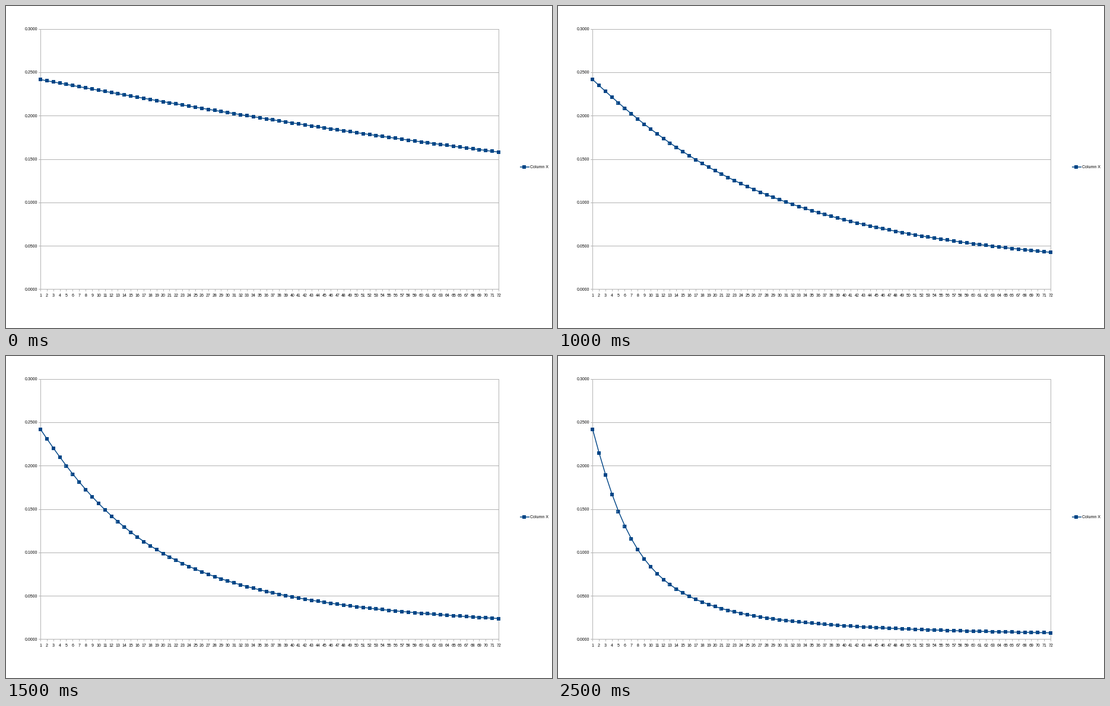
These frames come from a looping animation (920x544 px, 3 s). A matplotlib script:

```python
import numpy as np
import matplotlib.pyplot as plt
from matplotlib.animation import FuncAnimation
from matplotlib.collections import LineCollection, PolyCollection

W, H, DPI = 920, 544, 64
PT = 72 / DPI  # points per pixel
LEFT, RIGHT, TOP, BOTTOM = 58.5, 830.5, 39.5, 478.5
BLUE, GREY = "#004586", "#b3b3b3"
Y_MAX, COUNT, START = 0.3, 72, 0.242
RATES = [0.01, 0.02, 0.05, 0.08, 0.1, 0.2]


def to_x(n):
    return LEFT + (n - 1) * (RIGHT - LEFT) / (COUNT - 1)


def to_y(value):
    return BOTTOM - value * (BOTTOM - TOP) / Y_MAX


def decay(rate):
    """Each value shrinks by a share that depends on the value itself."""
    values = [START]
    while len(values) < COUNT:
        v = values[-1]
        u = -np.log(v)
        loss = rate * v * (4.044 * u - 0.225 * u * u - 2.917)
        values.append(v * (1 - loss + loss * loss / 6))
    return np.array(values)


def squares(xs, ys):
    r = 2.5
    return [[(x - r, y - r), (x + r, y - r), (x + r, y + r), (x - r, y + r)]
            for x, y in zip(xs, ys)]


def outlines(xs, ys):
    """Squares aligned to whole pixels."""
    return squares(np.floor(xs), np.floor(np.asarray(ys) + 0.5))


def add_series(xs, ys):
    line, = ax.plot(xs, ys, color=BLUE, lw=1.45 * PT, snap=False, zorder=3,
                    solid_joinstyle="round", solid_capstyle="butt")
    fill = PolyCollection(squares(xs, ys), facecolors=BLUE,
                          edgecolors="none", snap=False, zorder=4)
    edge = PolyCollection(outlines(xs, ys), facecolors="none",
                          edgecolors=BLUE, linewidths=PT, snap=False, zorder=5)
    ax.add_collection(fill)
    ax.add_collection(edge)
    return line, fill, edge


def label(x, y, text, align):
    ax.text(x, y, text, ha=align, va="baseline", color="black",
            family="Liberation Sans", fontsize=7 * PT)


fig = plt.figure(figsize=(W / DPI, H / DPI), dpi=DPI, facecolor="white")
ax = fig.add_axes([0, 0, 1, 1])
ax.set_xlim(0, W)
ax.set_ylim(H, 0)
ax.axis("off")

# Walls, grid, ticks and axis labels
xs = to_x(np.arange(1, COUNT + 1))
rules = [[(x, TOP), (x, BOTTOM)] for x in (LEFT, RIGHT)]
for k in range(7):
    value = k * 0.05
    row = np.floor(to_y(value)) + 0.5
    rules.append([(LEFT - 3.5, row), (RIGHT + 0.5, row)])
    label(53, round(481 - k * 220 / 3), f"{value:.4f}", "right")
for n, x in enumerate(xs, 1):
    tick = np.floor(x) + 0.5
    rules.append([(tick, BOTTOM), (tick, BOTTOM + 3.5)])
    label(x - 0.3, 491, str(n), "center")
ax.add_collection(LineCollection(rules, colors=GREY, linewidths=PT,
                                 snap=False, zorder=1))

# Legend
key, _, _ = add_series([873.5], [272])
key.set_data([866, 882], [272, 272])
label(883, 274, "Column X", "left")

steps = [to_y(decay(rate)) for rate in RATES]
line, fill, edge = add_series(xs, steps[0])


def update(i):
    ys = steps[i]
    line.set_data(xs, ys)
    fill.set_verts(squares(xs, ys))
    edge.set_verts(outlines(xs, ys))
    return line, fill, edge


anim = FuncAnimation(fig, update, frames=len(steps), interval=500,
                     init_func=lambda: update(0), repeat=True, repeat_delay=0)
plt.show()
```
